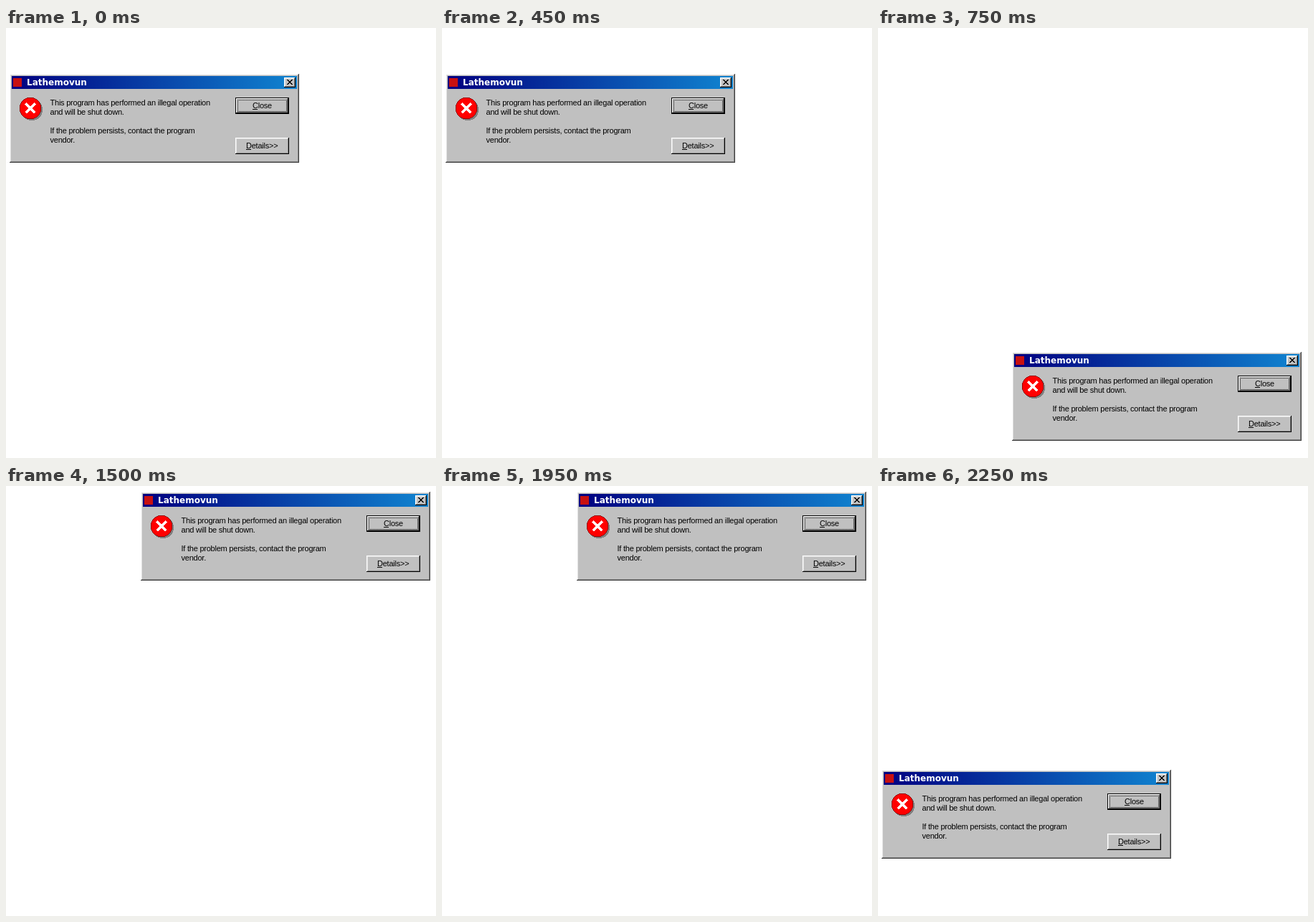
Recreate the animation shown at these times as an HTML page. Size 600 by 600 pixels, loop 3 s.

```html
<!DOCTYPE html>
<html lang="en">
<head>
<meta charset="utf-8">
<title>Error dialog</title>
<style>
  html, body { margin: 0; width: 100%; height: 100%; overflow: hidden; background: #fff; }
  #dialog, #dialog div, svg { position: absolute; }
  #dialog {
    left: 0; top: 0; width: 404px; height: 124px; background: #c0c0c0;
    box-shadow: inset -1px -1px #404040, inset 1px 1px #fff, inset -2px -2px #808080, inset 2px 2px #dfdfdf;
  }
  #bar { left: 3px; top: 3px; width: 398px; height: 18px; background: linear-gradient(90deg, #000080, #1084d0); }
  .button {
    left: 315px; width: 75px; height: 23px; background: #c0c0c0;
    box-shadow: inset -1px -1px #000, inset 1px 1px #fff, inset -2px -2px #808080, inset 2px 2px #dfdfdf;
  }
  #dialog .default {
    top: 33px;
    box-shadow: inset 0 0 0 1px #000, inset -2px -2px #000, inset 2px 2px #fff, inset -3px -3px #808080;
  }
  #details { top: 89px; }
  #dialog .corner { left: 383px; top: 5px; width: 16px; height: 14px; }
  svg { left: 0; top: 0; }
  text { font: 11px "Liberation Sans", Arial, sans-serif; letter-spacing: -.23px; }
  .title { font: bold 12px "DejaVu Sans", Verdana, sans-serif; letter-spacing: 0; fill: #fff; }
  .crisp { shape-rendering: crispEdges; }
</style>
</head>
<body>
<div id="dialog">
  <div id="bar"></div>
  <div class="button corner"></div>
  <div class="button default"></div>
  <div class="button" id="details"></div>
  <svg width="404" height="124" viewBox="0 0 404 124">
    <rect class="crisp" x="5" y="6" width="12" height="12" fill="#c81010"/>
    <text class="title" x="24" y="16">Lathemovun</text>
    <path class="crisp" d="M386.5 8h2l7 7h-2zM393.5 8h2l-7 7h-2z"/>

    <g class="crisp">
      <circle cx="31" cy="50" r="15.2" fill="#808080"/>
      <circle cx="29" cy="48" r="15" fill="#f00" stroke="#800000" stroke-width=".8"/>
      <path d="M22.5 41.5l13 13m0-13l-13 13" stroke="#fff" stroke-width="3.8"/>
    </g>

    <text x="56.5" y="44">This program has performed an illegal operation</text>
    <text x="56.5" y="57">and will be shut down.</text>
    <text x="56.5" y="83">If the problem persists, contact the program</text>
    <text x="56.5" y="96">vendor.</text>

    <rect class="crisp" x="318.5" y="36.5" width="68" height="16" fill="none" stroke="#000" stroke-dasharray="1" stroke-dashoffset=".5"/>
    <text x="339" y="48">Close</text>
    <text x="330" y="104">Details&gt;&gt;</text>
    <path class="crisp" d="M339 49.5h7M330 105.5h7" stroke="#000"/>
  </svg>
</div>
<script>
  const stops = [[5, 64], [187, 452], [188, 8], [5, 396]];
  const frames = [...stops, stops[0]].map(([x, y], i) => ({
    offset: i / stops.length,
    transform: `translate(${x}px, ${y}px)`,
    easing: "step-end"
  }));
  document.getElementById("dialog").animate(frames, { duration: 3000, iterations: Infinity });
</script>
</body>
</html>
```
